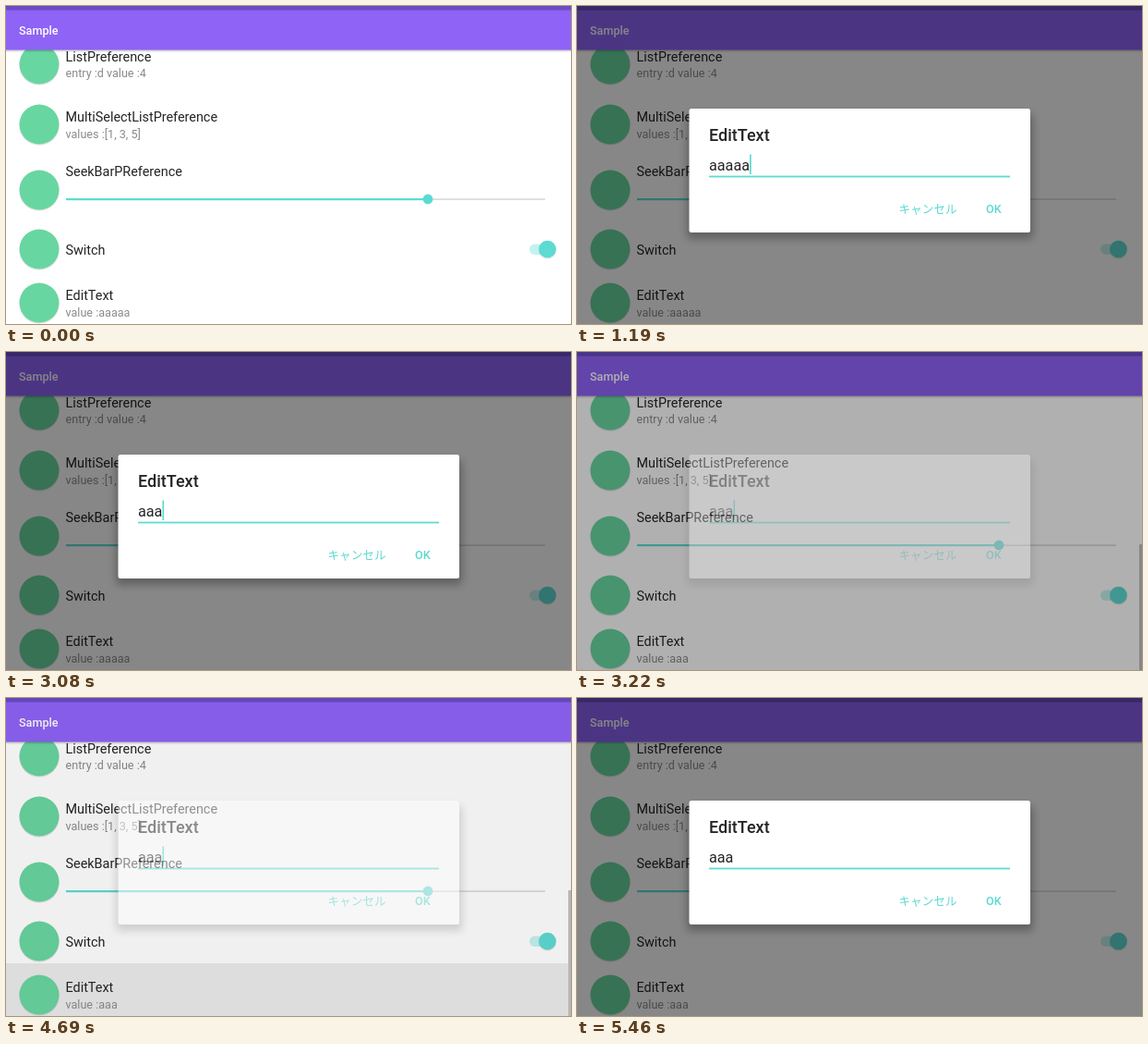
An HTML page that plays this animation: 612 by 344 pixels, repeating every 5600 ms.

```html
<!DOCTYPE html>
<html lang="en">
<head>
<meta charset="utf-8">
<title>Preferences</title>
<style>
  html, body { margin: 0; width: 100%; height: 100%; overflow: hidden; background: #fff; }
  svg { display: block; width: 100vw; height: 100vh; font-family: Roboto, sans-serif; }
  .title { font-size: 14.4px; fill: #242424; }
  .summary { font-size: 12.6px; fill: #8b8b8b; }
  .button { font-size: 12.6px; font-weight: 500; fill: #5cd9d0; }
  .jp { font-family: "Noto Sans CJK JP", "Noto Sans CJK", sans-serif; }
</style>
</head>
<body>
<svg viewBox="0 0 612 344" preserveAspectRatio="none">
  <defs>
    <clipPath id="rowClip"><rect y="287" width="612" height="57"/></clipPath>
    <linearGradient id="barShadow" x2="0" y2="1">
      <stop stop-color="#000" stop-opacity=".25"/>
      <stop offset="1" stop-color="#000" stop-opacity="0"/>
    </linearGradient>
    <filter id="blur" x="-10%" y="-20%" width="120%" height="140%">
      <feGaussianBlur stdDeviation="4"/>
    </filter>
  </defs>

  <rect width="612" height="344" fill="#fff"/>
  <circle id="ripple" cx="306" cy="316" clip-path="url(#rowClip)"/>
  <g id="rows"></g>

  <g id="seekBar">
    <rect x="457" y="208.3" width="127" height="1.6" fill="#d9d9d9"/>
    <rect x="65" y="208" width="392" height="2.2" fill="#5cdbd2"/>
    <circle cx="457" cy="209" r="5.4" fill="#5cdbd2"/>
  </g>
  <g id="switch">
    <rect x="567" y="257.5" width="27" height="11.5" rx="5.75" fill="#c3f2ef"/>
    <circle cx="586.5" cy="264" r="9.6" fill="#000" opacity=".12"/>
    <circle cx="586.5" cy="263" r="9.3" fill="#5cdbd2"/>
  </g>
  <rect id="scrollbar" x="609" y="208" width="3" height="136" fill="#c2c2c2"/>

  <rect y="47" width="612" height="3.5" fill="url(#barShadow)"/>
  <rect width="612" height="47.5" fill="#8e63f6"/>
  <rect width="612" height="4.5" fill="#6a4cc4"/>
  <text x="14" y="31" font-size="12.6" font-weight="500" fill="#fff">Sample</text>

  <rect id="dim" width="612" height="344"/>

  <g id="dialog">
    <rect x="119" y="117" width="375" height="135" rx="4" opacity=".27" filter="url(#blur)"/>
    <rect x="121.5" y="111" width="369.5" height="134" rx="2.5" fill="#fff"/>
    <text x="143" y="146.3" font-size="18" font-weight="500" fill="#242424">EditText</text>
    <text id="input" x="143" y="178" font-size="16.2" fill="#242424"></text>
    <rect x="143" y="183.6" width="326" height="1.8" fill="#5cdbd2"/>
    <rect id="cursor" y="160.5" width="1.7" height="21.5" fill="#5cdbd2"/>
    <text class="button jp" x="348.5" y="224">キャンセル</text>
    <text class="button" x="443" y="224.3">OK</text>
  </g>
</svg>
<script>
const LOOP = 5600, STEP = 70;
const TAPS = [0, 4200];
const CHAR_WIDTH = 8.81;
const $ = id => document.getElementById(id);
const set = (id, attrs) => {
  for (const [name, value] of Object.entries(attrs)) $(id).setAttribute(name, value);
};

// Linear interpolation through [time, value] points.
function track(points, t) {
  if (t <= points[0][0]) return points[0][1];
  for (let i = 1; i < points.length; i++) {
    const [t0, v0] = points[i - 1], [t1, v1] = points[i];
    if (t <= t1) return v0 + (v1 - v0) * (t - t0) / (t1 - t0);
  }
  return points[points.length - 1][1];
}

const openDialog = [[420, 0], [490, .5], [560, .9], [630, 1]];
const openDim = [[420, 0], [490, .06], [560, .28], [630, .47]];
const closeDialog = [[3080, 1], [3150, .7], [3220, .32], [3290, .08], [3360, 0]];
const closeDim = [[3080, .47], [3150, .42], [3220, .31], [3290, .18], [3360, .07], [3430, 0]];
const rippleAlpha = [[0, 0], [70, .02], [280, .08], [490, .08], [630, 0]];
const rippleRadius = [[0, 10], [350, 320]];
const scrollbarAlpha = [[4970, 1], [5180, 0]];

const rows = [
  { icon: 63, title: ["ListPreference", 59.7], summary: ["entry :d value :4", 77.3] },
  { icon: 128, title: ["MultiSelectListPreference", 125.2], summary: ["values :[1, 3, 5]", 143] },
  { icon: 199, title: ["SeekBarPReference", 183.7] },
  { icon: 263, title: ["Switch", 268.5] },
  { icon: 321, title: ["EditText", 318], summary: ["", 335.6] },
];
const label = (kind, [text, y]) => `<text class="${kind}" x="64.5" y="${y}">${text}</text>`;
$("rows").innerHTML = rows.map(({ icon, title, summary }) =>
  `<circle cx="36" cy="${icon + .8}" r="21.8" opacity=".12"/>
   <circle cx="36" cy="${icon}" r="21.4" fill="#68d6a0"/>` +
  label("title", title) + (summary ? label("summary", summary) : "")).join("");
const editSummary = $("rows").lastElementChild;

const within = (t, from, to) => t >= from && t < to;

function draw(t) {
  const sinceTap = t - (t < TAPS[1] ? TAPS[0] : TAPS[1]);
  const closing = within(t, 3080, TAPS[1]);
  const typed = t < 1470 ? 5 : t < 1610 ? 4 : 3;
  const cursorHidden = within(t, 700, 1190) || within(t, 2240, 2730) || t >= 5110;

  set("ripple", { r: track(rippleRadius, sinceTap), opacity: track(rippleAlpha, sinceTap) });
  set("dim", { opacity: closing ? track(closeDim, t) : track(openDim, sinceTap) });
  set("dialog", { opacity: closing ? track(closeDialog, t) : track(openDialog, sinceTap) });
  set("cursor", { x: 143 + typed * CHAR_WIDTH, opacity: cursorHidden ? 0 : 1 });
  set("scrollbar", { opacity: t < 3150 ? 0 : track(scrollbarAlpha, t) });
  $("input").textContent = "a".repeat(typed);
  editSummary.textContent = "value :" + "a".repeat(t < 3150 ? 5 : 3);
}

const start = performance.now();
function tick() {
  const t = (performance.now() - start) % LOOP;
  draw(Math.floor(t / STEP) * STEP);
  requestAnimationFrame(tick);
}
tick();
</script>
</body>
</html>
```
